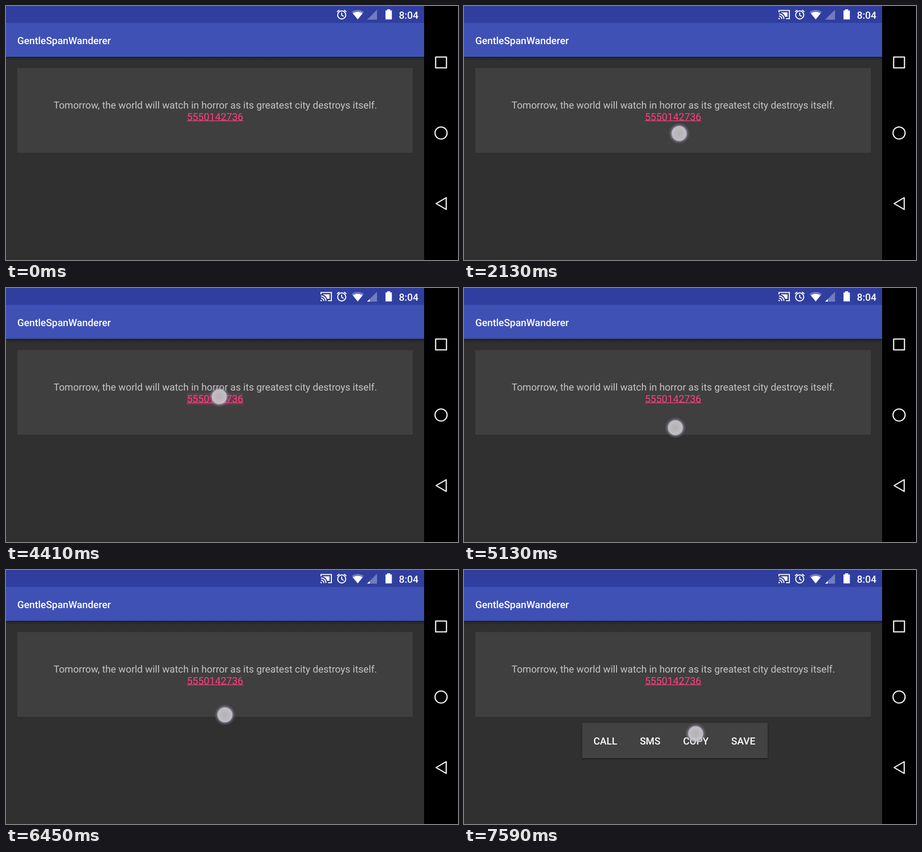
These frames come from a looping animation (960x540 px, 8 s). An HTML page:

```html
<!DOCTYPE html>
<html lang="en">
<head>
<meta charset="utf-8">
<title>Link touch demo</title>
<style>
  html, body { margin: 0; width: 100%; height: 100%; overflow: hidden; background: #303030; }
  svg { display: block; width: 100%; height: 100%; }
  text { font: 21px Roboto, sans-serif; fill: #fff; text-rendering: geometricPrecision; }
  .medium { font-weight: 500; }
  .body { font-size: 20.9px; fill: #c5c5c5; text-anchor: middle; }
  .link { font-size: 21.3px; fill: #ff4081; text-anchor: middle; }
  .line { fill: none; stroke: #fff; stroke-width: 2.2; }
  .solid { fill: #fff; }
  .dim { fill: #fff; opacity: .32; }
</style>
</head>
<body>
<svg viewBox="0 0 960 540">
  <defs>
    <linearGradient id="shade" x2="0" y2="1">
      <stop stop-opacity=".42"/>
      <stop offset=".4" stop-opacity=".16"/>
      <stop offset="1" stop-opacity="0"/>
    </linearGradient>
    <radialGradient id="touchFill">
      <stop offset="0" stop-color="#b9b7b9" stop-opacity=".94"/>
      <stop offset=".66" stop-color="#cac7cc" stop-opacity=".94"/>
      <stop offset=".72" stop-color="#b5aec4" stop-opacity=".7"/>
      <stop offset=".77" stop-color="#a098b2" stop-opacity=".44"/>
      <stop offset="1" stop-color="#8a83a0" stop-opacity="0"/>
    </radialGradient>
    <filter id="drop" x="-5%" y="-10%" width="110%" height="125%">
      <feDropShadow dx="0" dy="1.5" stdDeviation="1.5" flood-opacity=".5"/>
    </filter>
  </defs>

  <rect width="960" height="540" fill="#303030"/>
  <rect width="888" height="36" fill="#303f9f"/>
  <rect y="36" width="888" height="72" fill="#3f51b5"/>
  <rect y="108" width="888" height="9" fill="url(#shade)"/>
  <text class="medium" x="24" y="80.5">GentleSpanWanderer</text>

  <!-- status bar -->
  <g id="cast">
    <path class="line" d="M669 13.5V9.5H691V27H684M669 17A10.5 10.5 0 0 1 679.5 27.5M669 21.5A6 6 0 0 1 675 27.5"/>
    <path class="solid" d="M668 25a3 3 0 0 1 3 3h-3zM673 13.5H687V23H682Q680 16 673 14z"/>
  </g>
  <circle class="line" cx="713" cy="19" r="8.6"/>
  <path class="line" d="M713 14V19.5L717 22M703 12.5L708 8.5M723 12.5L718 8.5"/>
  <path class="dim" d="M747 28.5L734 12.5Q747 4.5 760 12.5z"/>
  <path class="solid" d="M747 28.5L736.5 15.5Q747 9.5 757.5 15.5z"/>
  <path class="dim" d="M788 8V29H767z"/>
  <path id="signal" class="solid" d="M772.5 23.5V29H767z"/>
  <path class="solid" d="M806 9.5H809.5V7H816V9.5H819.5V28.5H806z"/>
  <text class="medium" x="834.5" y="26.5">8:04</text>

  <!-- content card -->
  <rect x="24" y="132" width="840" height="180" fill="#3f3f3f"/>
  <rect id="highlight" x="384" y="223" width="120" height="26" fill="#ff4081"/>
  <text class="body" x="444.5" y="217.5">Tomorrow, the world will watch in horror as its greatest city destroys itself.</text>
  <text class="link" x="444" y="242.5">5550142736</text>
  <rect x="384" y="243.4" width="120" height="1.4" fill="#ff4081"/>

  <g id="popup">
    <rect x="251" y="325" width="394" height="75" rx="1.5" fill="#424242" filter="url(#drop)"/>
    <text class="medium" x="275" y="370.5">CALL<tspan dx="48">SMS</tspan><tspan dx="48">COPY</tspan><tspan dx="48">SAVE</tspan></text>
  </g>

  <!-- navigation bar -->
  <rect x="888" width="72" height="540"/>
  <g fill="none" stroke="#f2f2f2" stroke-width="2.6" stroke-linejoin="round">
    <rect x="912.5" y="108.5" width="23" height="23"/>
    <circle cx="924" cy="270" r="12.8"/>
    <path d="M913.5 420L935 407.5V432.5z"/>
  </g>

  <circle id="touch" r="22.5" fill="url(#touchFill)"/>
</svg>
<script>
const LOOP = 8000, STEP = 30;
const el = id => document.getElementById(id);
const progress = (t, start, length) => Math.max(0, Math.min(1, (t - start) / length));
const ease = k => (1 - Math.cos(Math.PI * k)) / 2;
const show = (id, opacity) => el(id).setAttribute('opacity', +opacity);

// The finger rests between moves; each move glides to a new spot.
const touchDown = { x: 557, y: 247 };
const copyButton = { x: 492, y: 348 };
const moves = [
  { start: 1110, length: 60, x: 411, y: 242 },
  { start: 1440, length: 150, x: 150, y: 252 },
  { start: 1590, length: 120, x: 457, y: 271 },
  { start: 2130, length: 780, x: 329, y: 232 },
  { start: 3390, length: 540, x: 453, y: 231 },
  { start: 4680, length: 450, x: 449, y: 297 },
  { start: 5130, length: 540, x: 471, y: 169 },
  { start: 5700, length: 720, x: 465, y: 308 },
  { start: 6450, length: 360, x: 453, y: 235 }
];

function finger(t) {
  if (t >= 7590) return copyButton;
  if (t < 870 || t >= 7020) return null;
  return moves.reduce((from, to) => {
    const k = ease(progress(t, to.start, to.length));
    return { x: from.x + (to.x - from.x) * k, y: from.y + (to.y - from.y) * k };
  }, touchDown);
}

function draw(now) {
  const t = Math.floor((now % LOOP) / STEP) * STEP;
  const spot = finger(t);
  show('touch', spot !== null);
  if (spot) el('touch').setAttribute('transform', `translate(${spot.x} ${spot.y})`);

  const onLink = spot && Math.abs(spot.y - 236) < 13 && t < 6300;
  show('highlight', onLink ? .4 * progress(t, 4380, 90) : 0);
  show('cast', t >= 30);
  show('signal', t >= 3660);
  show('popup', progress(t, 7020, 300));
  requestAnimationFrame(draw);
}
requestAnimationFrame(draw);
</script>
</body>
</html>
```
